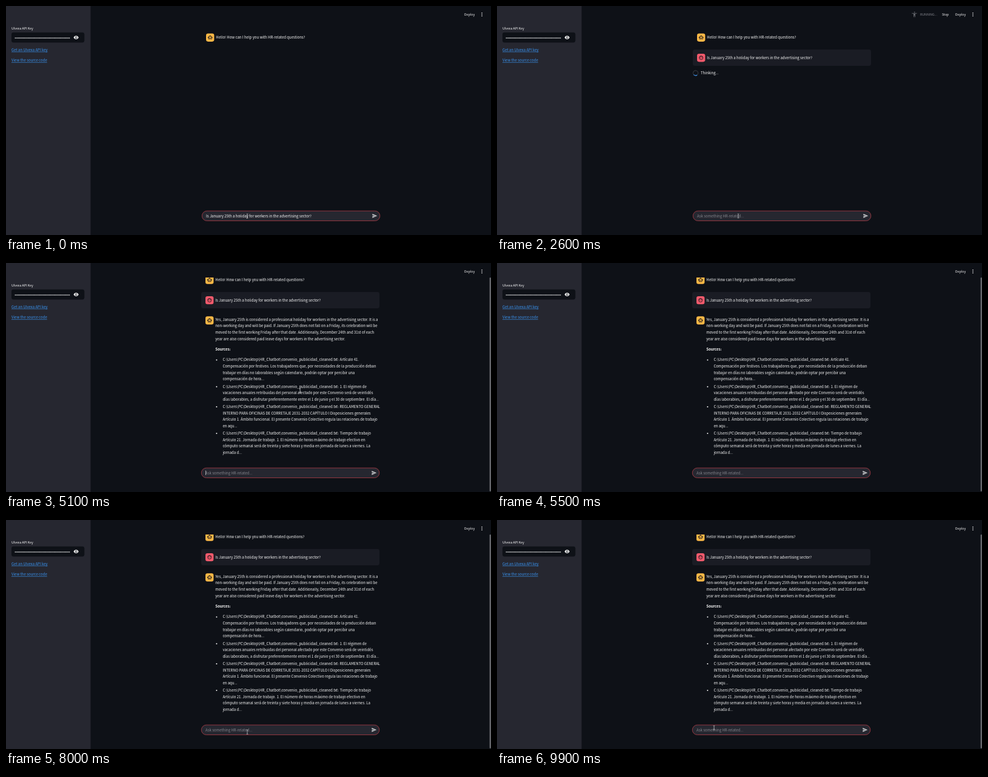
An HTML page for the animation above (10000 ms loop, 800 by 379 pixels).

```html
<!DOCTYPE html>
<html lang="en">
<head>
<meta charset="utf-8">
<title>HR chat</title>
<style>
html, body { margin: 0; width: 100%; height: 100%; overflow: hidden; background: #0e1117; }
svg { display: block; width: 800px; height: 379px; }
text { font: 6px "Noto Sans CJK JP", "Noto Sans CJK SC", "Noto Sans CJK", "Source Sans Pro", sans-serif; fill: #fafafa; white-space: pre; }
.small { font-size: 5.26px; }
.bold { font-weight: 700; }
.link { fill: #3994f2; text-decoration: underline; }
.faint { fill: #85868d; }
.pose { fill: none; stroke: #686a70; stroke-width: .9; stroke-linecap: round; stroke-linejoin: round; }
</style>
</head>
<body>
<svg viewBox="0 0 800 379">
  <defs>
    <g id="bot">
      <rect x="-6.7" y="-6.7" width="13.4" height="13.4" rx="3.3" fill="#fcb846"/>
      <path transform="translate(-4.2 -4.2) scale(.35)" fill="#0e1117" fill-rule="evenodd" d="M20 9V7c0-1.1-.9-2-2-2h-3c0-1.66-1.34-3-3-3S9 3.34 9 5H6c-1.1 0-2 .9-2 2v2c-1.66 0-3 1.34-3 3s1.34 3 3 3v4c0 1.1.9 2 2 2h12c1.1 0 2-.9 2-2v-4c1.66 0 3-1.34 3-3s-1.34-3-3-3zM18 19H6V7h12zM7.5 11.500a1.500 1.500 0 1 0 3 0a1.500 1.500 0 1 0-3 0zM13.500 11.500a1.500 1.500 0 1 0 3 0a1.500 1.500 0 1 0-3 0zM8 15h8v2H8z"/>
    </g>
    <g id="user">
      <rect x="-6.7" y="-6.7" width="13.4" height="13.4" rx="3.3" fill="#f25a6c"/>
      <g fill="none" stroke="#0e1117" stroke-width=".75">
        <circle r="3.1"/>
        <path d="M-3-.5Q-1-.8-.5-2.800Q.7-.9 3-1.100"/>
      </g>
      <path d="M-1.100.6h.01M1.100.6h.01" stroke="#0e1117" stroke-width=".95" stroke-linecap="round"/>
    </g>
    <clipPath id="view"><rect x="140" y="24" width="660" height="355"/></clipPath>
  </defs>

  <rect width="800" height="379" fill="#0e1117"/>
  <rect width="139.5" height="379" fill="#262730"/>
  <text class="small" x="9" y="39.300">Ulvexa API Key</text>
  <rect x="9" y="43.700" width="120.300" height="16.800" rx="3.400" fill="#0e1117"/>
  <path d="M15.200 53H105" stroke="#fafafa" stroke-width="1.450" stroke-linecap="round" stroke-dasharray="0 1.790"/>
  <path transform="translate(111.200 47.700) scale(.37)" fill="#fafafa" fill-rule="evenodd" d="M12 4.500C7 4.500 2.730 7.610 1 12c1.730 4.390 6 7.500 11 7.500s9.270-3.110 11-7.500c-1.730-4.390-6-7.500-11-7.500zM7 12a5 5 0 1 0 10 0a5 5 0 1 0-10 0zM9 12a3 3 0 1 0 6 0a3 3 0 1 0-6 0z"/>
  <text class="link" x="9" y="74.700">Get an Ulvexa API key</text>
  <text class="link" x="9" y="92.300">View the source code</text>

  <text class="small" x="756" y="16">Deploy</text>
  <path d="M785 11.500v.01M785 14v.01M785 16.500v.01" stroke="#fafafa" stroke-width="1.600" stroke-linecap="round"/>

  <g id="running">
    <g class="pose">
      <path d="M684.700 12.200Q688.500 13 692.300 12.200M688.500 13V15.500M687.500 12.900V18M689.500 12.900V18"/>
      <circle cx="688.500" cy="10.300" r=".5"/>
    </g>
    <g class="pose">
      <path d="M685.500 13.300L687 11.600L689 12L688 14.700L690 16V18.300M688 14.700L687 16.300L684.500 16M689 12L690 13.300H691.700"/>
      <circle cx="690" cy="10" r=".5"/>
    </g>
    <g class="pose">
      <circle cx="685.700" cy="16" r="2.200"/><circle cx="691.700" cy="16" r="2.200"/>
      <path d="M688.700 17V15L686.800 13.400L689 11.500L690.500 13.100H692.300"/>
      <circle cx="690.300" cy="9.700" r=".5"/>
    </g>
    <text class="small" x="698" y="16" style="fill:#85868d">RUNNING...</text>
    <text class="small" x="734" y="16">Stop</text>
  </g>

  <g clip-path="url(#view)">
    <g id="chat">
      <use href="#bot" x="336.700" y="52.200"/>
      <text x="346.300" y="54.300">Hello! How can I help you with HR-related questions?</text>
      <g id="asked">
        <rect x="323" y="72" width="294" height="27" rx="3.400" fill="#1a1c24"/>
        <use href="#user" x="336.700" y="85.700"/>
        <text x="346.300" y="87.800">Is January 25th a holiday for workers in the advertising sector?</text>
      </g>
    </g>
    <g id="thinking">
      <g id="spinner" fill="none" stroke-width="1.100">
        <circle r="4.100" stroke="#35383e"/>
        <path d="M-2.900-2.900A4.100 4.100 0 0 1 2.900-2.900" stroke="#3994f2"/>
      </g>
      <text x="336" y="113.300">Thinking...</text>
    </g>
    <g id="answer">
      <use href="#bot" x="335.700" y="95"/>
      <rect x="797.600" y="24" width="2.400" height="354" rx="1.200" fill="#65676c"/>
    </g>
  </g>

  <g id="input">
    <rect x="323.300" y="339.200" width="293.500" height="16.300" rx="8.100" fill="#262730" stroke="#c5434c" stroke-width=".7"/>
    <text id="draft" x="330" y="349.500">Is January 25th a holiday for workers in the advertising sector?</text>
    <text id="hint" class="faint" x="330" y="349.500">Ask something HR-related...</text>
    <rect id="caret" y="343.500" width=".6" height="7.500" fill="#fafafa"/>
    <path transform="translate(603.600 342.800) scale(.375)" fill="#c9cacd" d="M2 21L23 12L2 3V10L17 12L2 14z"/>
  </g>

  <path id="beam" d="M-1.300-3.500Q0-3.500 0-2.800Q0-3.500 1.300-3.500M0-2.800V2.800M-1.300 3.500Q0 3.500 0 2.800Q0 3.500 1.300 3.500" fill="none" stroke="#d0d1d4" stroke-width=".7"/>
  <path id="arrow" d="M0 0V7L1.600 5.600L2.700 8L3.800 7.500L2.800 5.200H4.900z" fill="#fff" stroke="#0e1117" stroke-width=".4"/>
</svg>
<script>
const LOOP = 10000, SENT = 2000, RUN = 2400, REPLY = 5000;
const LINE = 10.7;
const $ = id => document.getElementById(id);
const show = (el, on) => el.style.display = on ? '' : 'none';
const move = (el, x, y, turn = 0) => el.setAttribute('transform', `translate(${x} ${y}) rotate(${turn})`);

function add(tag, attrs, text = '') {
  const el = document.createElementNS('http://www.w3.org/2000/svg', tag);
  for (const key in attrs) el.setAttribute(key, attrs[key]);
  el.textContent = text;
  $('answer').append(el);
}

function addLines(x, y, lines) {
  lines.forEach((line, i) => add('text', { x, y: y + i * LINE }, line));
}

const file = 'C:\\Users\\PC\\Desktop\\HR_Chatbot\\convenio_publicidad_cleaned.txt: ';
const sources = [
  [162.3, ['Artículo 41.',
    'Compensación por festivos. Los trabajadores que, por necesidades de la producción deban',
    'trabajar en días no laborables según calendario, podrán optar por percibir una',
    'compensación de hora...']],
  [206.6, ['1. El régimen de',
    'vacaciones anuales retribuidas del personal afectado por este Convenio será de veintidós',
    'días laborables, a disfrutar preferentemente entre el 1 de junio y el 30 de septiembre. El día...']],
  [239.9, ['REGLAMENTO GENERAL',
    'INTERNO PARA OFICINAS DE CORRETAJE 2031-2032 CAPÍTULO I Disposiciones generales',
    'Artículo 1. Ámbito funcional. El presente Convenio Colectivo regula las relaciones de trabajo',
    'en aqu...']],
  [283.9, ['Tiempo de trabajo',
    'Artículo 21. Jornada de trabajo. 1. El número de horas máximo de trabajo efectivo en',
    'cómputo semanal será de treinta y siete horas y media en jornada de lunes a viernes. La',
    'jornada d...']]
];

addLines(345.2, 95.6, [
  'Yes, January 25th is considered a professional holiday for workers in the advertising sector. It is a',
  'non-working day and will be paid. If January 25th does not fall on a Friday, its celebration will be',
  'moved to the first working Friday after that date. Additionally, December 24th and 31st of each',
  'year are also considered paid leave days for workers in the advertising sector.'
]);
add('text', { x: 345.2, y: 144.8, class: 'bold' }, 'Sources:');
for (const [y, [first, ...rest]] of sources) {
  add('circle', { cx: 347.4, cy: y - 1.9, r: 1, fill: '#fafafa' });
  addLines(357.4, y, [file + first, ...rest]);
}

// Pointer stops: time, x, y
const stops = [
  [0, 398, 347.5], [2700, 398, 347.5], [3600, 485, 211.5], [5500, 485, 211.5],
  [6500, 475, 228.5], [7000, 475, 228.5], [7700, 398, 351], [8000, 398, 351],
  [8400, 385, 357], [9200, 358, 344], [LOOP, 358, 344]
];

function pointer(t) {
  const i = stops.findIndex(s => s[0] > t);
  const [t0, x0, y0] = stops[i - 1], [t1, x1, y1] = stops[i];
  const p = (t - t0) / (t1 - t0), e = p * p * (3 - 2 * p);
  return [x0 + (x1 - x0) * e, y0 + (y1 - y0) * e];
}

const draftEnd = 330.3 + $('draft').getComputedTextLength();
const poses = document.querySelectorAll('.pose');

function draw(t) {
  const sent = t >= SENT, replied = t >= REPLY, running = t >= RUN && !replied;
  show($('asked'), sent);
  show($('thinking'), sent && !replied);
  show($('answer'), replied);
  show($('running'), running);
  show($('draft'), !sent);
  show($('hint'), sent);

  const shift = replied ? -1 : 0;
  move($('chat'), shift, replied ? -24.1 : 0);
  move($('input'), shift, 0);
  move($('spinner'), 327.6, 111, 235 + (t - 4200) / 750 * 360);
  const pose = Math.floor((t - RUN) / 320) % 3;
  poses.forEach((el, i) => show(el, i === pose));

  const blink = (t + 51 + (sent ? 0 : 424)) / 1060 + 5.283;
  $('caret').setAttribute('x', sent ? 330 : draftEnd);
  show($('caret'), blink % 1 < .5);

  const [x, y] = pointer(t);
  const arrow = sent && y < 339 && (!replied || y > 319);
  show($('arrow'), arrow);
  show($('beam'), !arrow);
  move($(arrow ? 'arrow' : 'beam'), x, y);
}

function tick() {
  draw(performance.now() % LOOP);
  requestAnimationFrame(tick);
}
tick();
</script>
</body>
</html>
```
